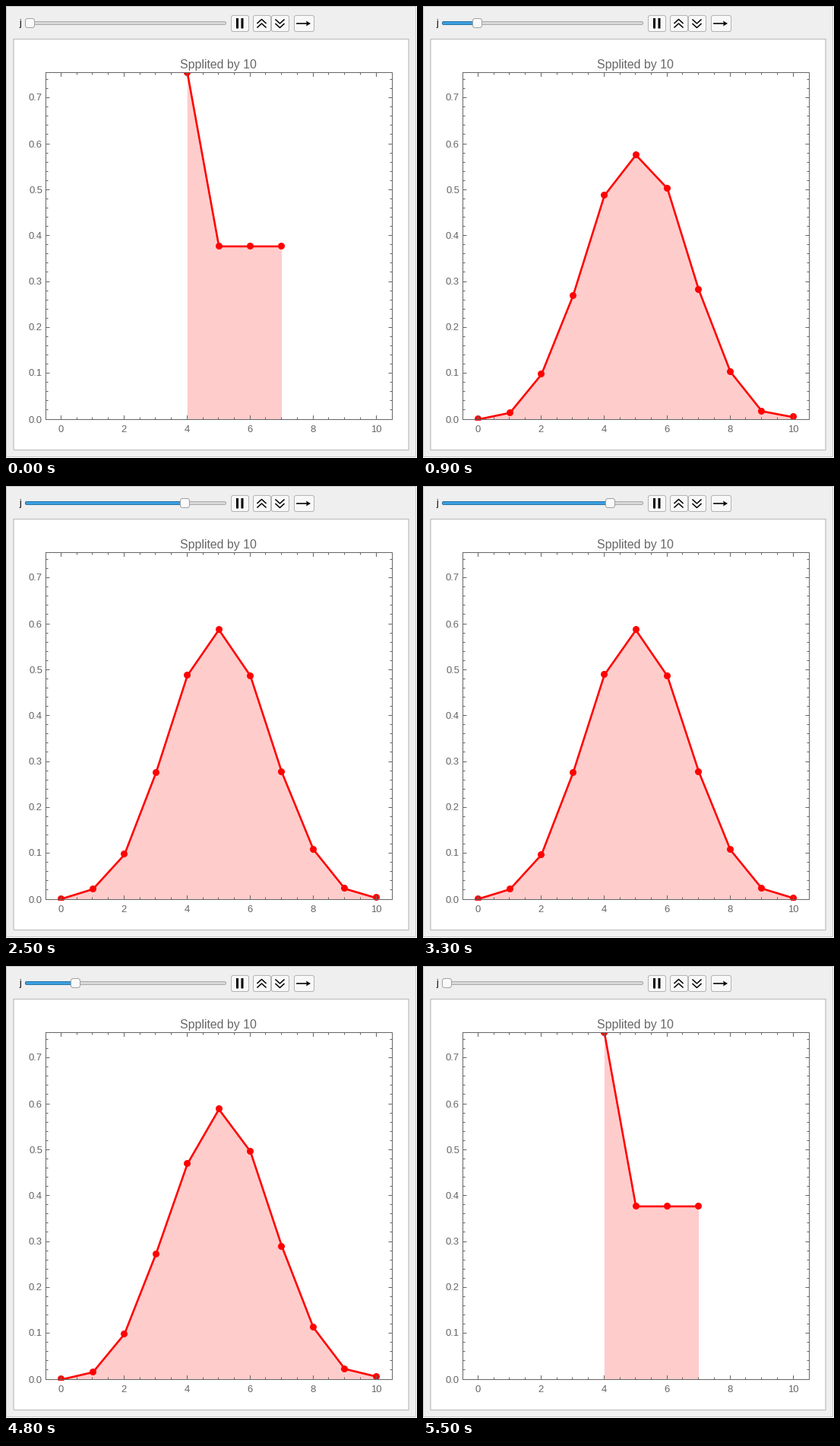
A matplotlib script that plays this animation: 541 px wide and 594 px high, repeating every 6 s.

```python
import math

import numpy as np
import matplotlib.pyplot as plt
from matplotlib.animation import FuncAnimation
from matplotlib.patches import FancyBboxPatch, Polygon, Rectangle

W, H, DPI = 541, 594, 64
PX = 72 / DPI  # points per pixel
GREY = "#666666"
RED = "#ff0000"
LEFT, RIGHT, TOP, BOTTOM = 52.5, 508.5, 87.5, 543.5
FRAMES = 60
LAST = 25  # highest step of the sweep

plt.rcParams["font.family"] = "Liberation Sans"
plt.rcParams["path.snap"] = False
fig = plt.figure(figsize=(W / DPI, H / DPI), dpi=DPI, facecolor="white")
ax = fig.add_axes([0, 0, 1, 1])
ax.set_xlim(0, W)
ax.set_ylim(H, 0)
ax.axis("off")


def px(x):
    return 73 + (RIGHT - LEFT) / 11 * np.asarray(x)


def py(y):
    return 543.9 - (BOTTOM - TOP) * math.sqrt(7) / 2 * np.asarray(y)


def pixel(v):
    """Centre of the pixel that holds v."""
    return math.floor(v) + 0.5


def box(x0, y0, x1, y1, face, edge, radius=0, width=1, z=1):
    style = f"round,pad=0,rounding_size={radius}" if radius else "square,pad=0"
    patch = FancyBboxPatch((x0, y0), x1 - x0, y1 - y0, boxstyle=style, fc=face,
                           ec=edge, lw=width * PX, zorder=z)
    return ax.add_patch(patch)


def stroke(xs, ys, color, width=1, z=5, **kw):
    return ax.plot(xs, ys, color=color, lw=width * PX, zorder=z, **kw)[0]


def tick(xs, ys):
    stroke(xs, ys, GREY, solid_capstyle="butt")


def label(x, y, text, size, color=GREY, ha="center"):
    ax.text(x, y, text, fontsize=size * PX, color=color, ha=ha,
            va="baseline", zorder=6)


def chevrons(x, y, rise):
    for top in (y, y + 5.5):
        stroke([x - 5.5, x, x + 5.5], [top, top + rise, top], "black", 1.5)


def draw_buttons():
    for x, width in ((296.5, 23), (325.5, 23), (349.5, 23), (379.5, 26)):
        box(x, 12.5, x + width, 33.5, "#f8f8f8", "#b4b4b4", 2.5)
    for x in (303, 309.5):
        ax.add_patch(Rectangle((x, 16), 3, 13.5, fc="black", lw=0, zorder=3))
    chevrons(336.5, 22.5, -5)
    chevrons(360.5, 18, 5)
    stroke([383, 397], [23, 23], "black", 1.6)
    ax.add_patch(Polygon([(401, 23), (395, 19.5), (396, 23), (395, 26.5)],
                         fc="black", lw=0, zorder=5))


def draw_frame():
    stroke([LEFT, RIGHT, RIGHT, LEFT, LEFT], [TOP, TOP, BOTTOM, BOTTOM, TOP],
           GREY, solid_joinstyle="miter")
    for i in range(21):
        x = pixel(px(i / 2) - 0.5)
        size = 3 if i % 4 else 5.5
        tick([x, x], [BOTTOM, BOTTOM - size])
        tick([x, x], [TOP, TOP + size])
        if i % 4 == 0:
            label(x, 560, str(i // 2), 13)
    for i in range(38):
        y = pixel(py(i / 50) - 0.9)
        size = 3 if i % 5 else 5
        tick([LEFT, LEFT + size], [y, y])
        tick([RIGHT, RIGHT - size], [y, y])
        if i % 5 == 0:
            label(48, y + 4, f"{i / 50:.1f}", 13, ha="right")
    label(279.4, 82, "Spplited by 10", 15.9)


def make_histograms():
    """Unit-length histograms of coin-toss sums as the sample grows."""
    rng = np.random.default_rng(8)
    heads = 0.503
    odds = [math.comb(10, i) * heads**i * (1 - heads)**(10 - i) for i in range(11)]
    counts = np.bincount([4, 4, 5, 6, 7], minlength=11)
    result = []
    for k in range(LAST + 1):
        result.append(counts / np.linalg.norm(counts))
        counts = counts + rng.multinomial(500 if k else 5, odds)
    return result


def thumb_x(k):
    return pixel(max(31, 30.2 + 10.28 * (k - 1)))


box(0.5, 0.5, 539.5, 592.5, "#efefef", "#c8c8c8", z=0)
box(10, 43.5, 530, 583.5, "white", "#c0c0c0", width=1.3)
label(18.3, 26, "j", 12, "black")
box(25.5, 20.5, 289.5, 24.5, "#d8d8d8", "#a9a9a9", 1.8)
done = box(25.5, 20.5, 60, 24.5, "#3c9fe0", "#2a75a8", 1.8, z=2)
thumb = box(25.5, 16.5, 37.5, 28.5, "#fafafa", "#a2a2a2", 3, z=3)
draw_buttons()
draw_frame()

histograms = make_histograms()
clip = Rectangle((LEFT, TOP - 0.5), RIGHT - LEFT, BOTTOM - TOP + 0.5,
                 transform=ax.transData)
area = ax.add_patch(Polygon([(0, 0), (1, 1), (1, 0)], fc="#ffcccc", lw=0, zorder=2))
curve = stroke([], [], RED, 2.6, z=3, solid_joinstyle="round",
               solid_capstyle="butt")
dots = ax.plot([], [], "o", color=RED, ms=9 * PX, mew=0, zorder=4)[0]
for artist in (area, curve, dots):
    artist.set_clip_path(clip)


def update(i):
    # Forward sweep, then the same steps backwards
    k = min(max(min(i, FRAMES - 1 - i) - 4, 0), LAST)
    values = histograms[k]
    bins = np.flatnonzero(values)
    xs, ys = px(bins), py(values[bins])
    curve.set_data(xs, ys)
    dots.set_data(xs - 0.7, ys - 1)
    area.set_xy([(xs[0], BOTTOM), *zip(xs, ys), (xs[-1], BOTTOM)])
    x = thumb_x(k)
    thumb.set_x(x - 6)
    done.set_width(x - 25.5)
    done.set_visible(k > 1)
    return area, curve, dots, thumb, done


anim = FuncAnimation(fig, update, frames=FRAMES, interval=100, repeat=True,
                     repeat_delay=0, blit=False)
plt.show()
```
